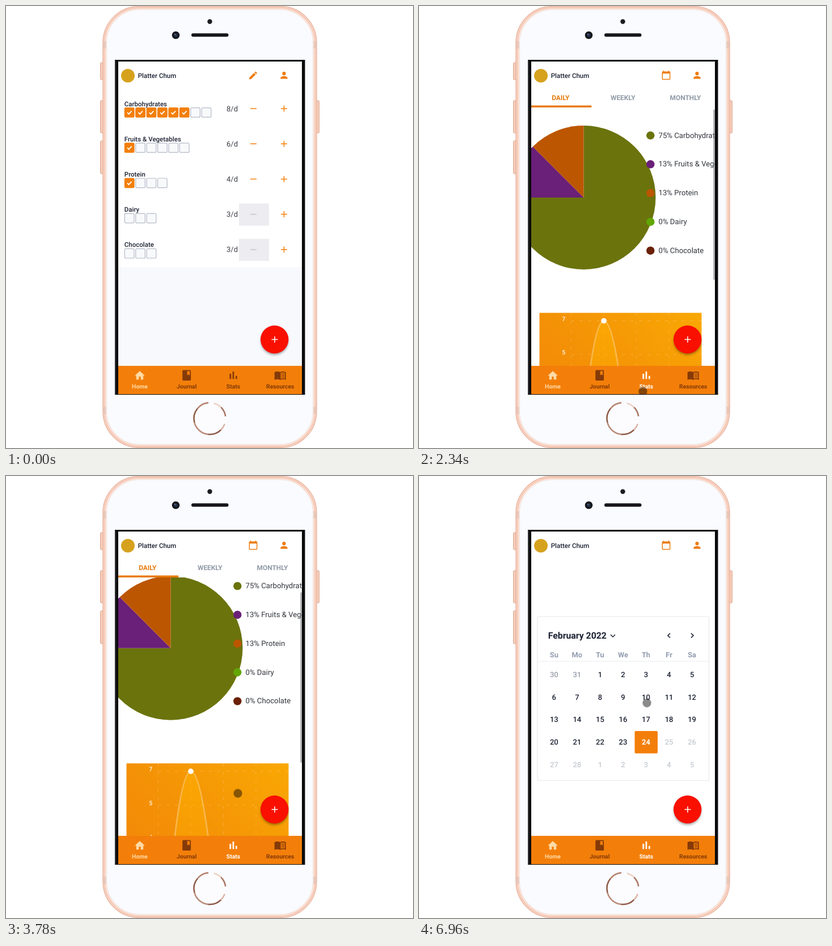
These frames come from a looping animation (718 px wide and 780 px high, 6.99 s). An HTML page:

```html
<!DOCTYPE html>
<html lang="en">
<head>
<meta charset="utf-8">
<title>Portion tracker demo</title>
<style>
  html, body { margin: 0; width: 100%; height: 100%; overflow: hidden; background: #fff; }
  svg { display: block; width: 100%; height: 100%; font-family: Roboto, "Open Sans", sans-serif; text-rendering: geometricPrecision; }
</style>
</head>
<body>
<svg id="stage" viewBox="0 0 718 780"></svg>
<script>
const LOOP = 6990;
const ORANGE = '#f37f0a';
const INK = '#1c2233';

const ICONS = {
  pencil: 'M3 17.2V21h3.8L17.8 9.9l-3.7-3.7zM20.7 7c.4-.4.4-1 0-1.4l-2.3-2.3c-.4-.4-1-.4-1.4 0l-1.9 1.8 3.8 3.8z',
  person: 'M12 12a4 4 0 1 0 0-8a4 4 0 0 0 0 8zm0 2c-2.7 0-8 1.3-8 4v2h16v-2c0-2.7-5.3-4-8-4z',
  calendar: 'M20 3h-1V1h-2v2H7V1H5v2H4a2 2 0 0 0-2 2v16a2 2 0 0 0 2 2h16a2 2 0 0 0 2-2V5a2 2 0 0 0-2-2zm0 18H4V8h16z',
  home: 'M10 20.5v-6h4v6h5v-8h3l-10-9-10 9h3v8z',
  book: 'M6 2h12a2 2 0 0 1 2 2v16a2 2 0 0 1-2 2H6a2 2 0 0 1-2-2V4a2 2 0 0 1 2-2zM18 4h-5v8l2.5-1.5L18 12z',
  bars: 'M5 9.2h3V19H5zM10.6 5h2.8v14h-2.8zM16.2 13H19v6h-2.8z',
  reader: 'M1 6c3-2 8-2 11 0c3-2 8-2 11 0v15c-3-1.6-8-1.6-11 0c-3-1.6-8-1.6-11 0zM13 7.5v11.2c2.5-1 5.5-1 8-.4V7c-2.5-.8-5.5-.7-8 .5zM14.5 9c2-.7 3.5-.7 5.5-.4v1.5c-2-.3-3.5-.3-5.5.4zM14.5 12c2-.7 3.5-.7 5.5-.4v1.5c-2-.3-3.5-.3-5.5.4zM14.5 15c2-.7 3.5-.7 5.5-.4v1.5c-2-.3-3.5-.3-5.5.4z'
};

const rect = (x, y, w, h, fill, extra = '') =>
  `<rect x="${x}" y="${y}" width="${w}" height="${h}" fill="${fill}" ${extra}/>`;
const circle = (x, y, r, fill, extra = '') =>
  `<circle cx="${x}" cy="${y}" r="${r}" fill="${fill}" ${extra}/>`;
const line = (d, color, width = 1.5, extra = '') =>
  `<path d="${d}" fill="none" stroke="${color}" stroke-width="${width}" ${extra}/>`;
const text = (x, y, size, weight, fill, str, anchor = 'start') =>
  `<text x="${x}" y="${y}" font-size="${size}" font-weight="${weight}" fill="${fill}" text-anchor="${anchor}">${str}</text>`;
const icon = (name, x, y, scale, fill, id = '') =>
  `<path ${id && `id="${id}"`} d="${ICONS[name]}" fill="${fill}" fill-rule="evenodd" transform="translate(${x} ${y}) scale(${scale}) translate(-12 -12)"/>`;
const minus = (x, y, color) => line(`M${x - 5.5} ${y}h11`, color);
const plus = (x, y, color, r = 5.5) => line(`M${x - r} ${y}h${2 * r}M${x} ${y - r}v${2 * r}`, color);

function phone() {
  const button = (x, y, h) => rect(x, y, 6, h, '#f6cdbb', 'rx="1.5" stroke="#dda58f" stroke-width="1"');
  const bands = [171, 541].map(x => [62, 707].map(y => rect(x, y, 7, 13, '#e3c4b8', 'opacity=".7"')).join('')).join('');
  const arc = (from, to, color) => {
    const at = deg => {
      const a = deg * Math.PI / 180;
      return `${359.5 + 28 * Math.cos(a)} ${728 + 28 * Math.sin(a)}`;
    };
    return line(`M${at(from)}A28 28 0 0 1 ${at(to)}`, color, 2.6);
  };
  return button(166.5, 100, 30) + button(166.5, 167, 57) + button(166.5, 238, 58) + button(546.5, 167, 57) +
    rect(171, 0.6, 377, 778.8, '#fbe0d5', 'rx="64" stroke="#e6ad96" stroke-width="1.3"') +
    rect(173.5, 3, 372, 774, 'none', 'rx="62" stroke="#f5c5b2" stroke-width="2"') + bands +
    rect(177.5, 6.5, 364, 767, '#fafbff', 'rx="58" stroke="#f4e9e5" stroke-width="1.5"') +
    circle(359.5, 27.5, 4.2, '#1b1b20') +
    circle(299.5, 51.5, 6.8, '#15161c') + circle(299.5, 51.5, 3, '#26344f') + circle(298, 50, 1, '#7d8ba5') +
    rect(327, 48.3, 65.5, 6, '#17171b', 'rx="3"') +
    circle(359.5, 728, 28, '#fcfcff') +
    arc(0, 360 - .1, '#f7ece7') + arc(95, 165, '#b98a78') + arc(165, 220, '#8e5b47') + arc(220, 265, '#b88672') +
    arc(285, 315, '#ecd0c4') + arc(315, 352, '#a97562') + arc(45, 95, '#8e5b47') + arc(20, 45, '#dbb5a6') +
    rect(192, 95, 335.5, 591, '#0b0b0c') + line('M193 96V685.5', '#55565a', 1);
}

function homeScreen() {
  const rows = [['Carbohydrates', 8, 6], ['Fruits &amp; Vegetables', 6, 1], ['Protein', 4, 1], ['Dairy', 3, 0], ['Chocolate', 3, 0]];
  const box = (x, y, on) =>
    rect(x + .6, y + .6, 16.6, 16.6, on ? ORANGE : '#f8f9fb', `rx="2" stroke="${on ? ORANGE : '#b3bac8'}" stroke-width="1.2"`) +
    (on ? line(`M${x + 5.2} ${y + 9}l2.6 2.7l5-5.3`, '#fff', 1.8) : '');
  const row = ([name, total, done], i) => {
    const y = 181 + i * 62.2;
    let out = text(208.8, y - 4.4, 11.5, 500, INK, name);
    for (let k = 0; k < total; k++) out += box(208.8 + k * 19.4, y - 2, k < done);
    out += text(389, y + 4.6, 13, 400, '#3c3f47', total + '/d');
    if (!done) out += rect(411, y - 19, 53, 39, '#ececf1');
    return out + minus(436.5, y, done ? ORANGE : '#c3c6cd') + plus(490.5, y, ORANGE);
  };
  return rect(198, 98, 324, 363, '#fff') + rows.map(row).join('') + icon('pencil', 436, 122.5, .76, '#ee7c10');
}

function pieAndLegend() {
  const cx = 290.5, cy = 338, r = 127, k = r * Math.SQRT1_2;
  const slice = (fromX, fromY, toX, toY, fill, large = 0) =>
    `<path d="M${cx} ${cy}L${cx + fromX} ${cy + fromY}A${r} ${r} 0 ${large} 1 ${cx + toX} ${cy + toY}z" fill="${fill}"/>`;
  const items = [['75% Carbohydrates', '#6b730d'], ['13% Fruits &amp; Vegetables', '#6a1f78'], ['13% Protein', '#bc5600'],
    ['0% Dairy', '#62a604'], ['0% Chocolate', '#6a2106']];
  return slice(0, -r, -r, 0, items[0][1], 1) + slice(-r, 0, -k, -k, items[1][1]) + slice(-k, -k, 0, -r, items[2][1]) +
    items.map(([label, color], i) => {
      const y = 228.5 + i * 50.8;
      return circle(408.3, y, 7.2, color) + text(422.5, y + 4, 13.2, 400, '#33363c', label);
    }).join('');
}

function lineChart() {
  const top = 555.5, bottom = 794;
  const points = [0, 7, 1, 0].map((v, i) => [268.5 + i * 57.5, bottom - v * (bottom - top) / 7]);
  let curve = `M${points[0]}`;
  points.slice(1).forEach(([x, y], i) => {
    const [px, py] = points[i], mx = (px + x) / 2, my = (py + y) / 2;
    curve += `Q${(px + mx) / 2} ${py} ${mx} ${my}Q${(mx + x) / 2} ${y} ${x} ${y}`;
  });
  let grid = '', labels = '';
  [7, 5, 4, 2, 0].forEach((v, i) => {
    const y = top + i * (bottom - top) / 4;
    grid += `M268.5 ${y}H498`;
    labels += text(258.5, y + .3, 10.8, 500, '#fff3df', v, 'end');
  });
  ['Morning', 'Afternoon', 'Evening', 'Night'].forEach((name, i) => {
    const x = points[i][0];
    grid += `M${x} 541.5V${bottom}`;
    labels += text(x, 815.5, 10.5, 500, '#fff0d8', name, 'middle');
  });
  return rect(212.5, 541.5, 286, 318.5, 'url(#chartFill)') +
    line(grid, 'rgba(255,255,255,.22)', 1, 'stroke-dasharray="5 10"') +
    `<path d="${curve}z" fill="url(#areaFill)"/>` + line(curve, 'rgba(255,255,255,.28)', 2.8) +
    points.map(([x, y]) => circle(x, y, 4.8, '#fff')).join('') + labels;
}

function statsScreen() {
  const tab = (x, name, color) => text(x, 166.2, 11.9, 700, color, name, 'middle');
  return rect(198, 98, 324, 537, '#fff') +
    `<g clip-path="url(#scrollClip)"><g id="content">${pieAndLegend()}${lineChart()}</g>` +
    rect(519, 183, 3, 300, '#6d7078', 'id="scrollbar" opacity=".5"') + '</g>' +
    tab(249.8, 'DAILY', '#e87a0d') + tab(359.8, 'WEEKLY', '#8f99a6') + tab(470, 'MONTHLY', '#8f99a6') +
    rect(196, 175.5, 108.5, 3.4, '#e87a0d', 'rx="1.5"');
}

function calendarScreen() {
  const column = i => 238.3 + i * 40.55;
  let out = rect(198, 98, 324, 537, '#fff') +
    rect(209, 248, 302.5, 289.5, '#fff', 'rx="3" stroke="#e7e9ee" stroke-width="1.2"') +
    text(227.8, 286.5, 15.8, 700, INK, 'February 2022') +
    line('M338 280l4 4l4-4', INK) + line('M443 277.5l-4 4l4 4', INK, 1.7) + line('M480 277.5l4 4l-4 4', INK, 1.7) +
    line('M209.5 327.2H511', '#e9ebf0', 1) + rect(380.5, 450, 40.5, 39.5, ORANGE, 'rx="2"');
  ['Su', 'Mo', 'Tu', 'We', 'Th', 'Fr', 'Sa'].forEach((d, i) => {
    out += text(column(i), 319.7, 12.8, 700, '#929cb0', d, 'middle');
  });
  for (let i = 0; i < 35; i++) {
    const offset = i - 1;
    const day = offset < 1 ? offset + 31 : offset > 28 ? offset - 28 : offset;
    const color = offset < 1 ? '#989daa' : offset === 24 ? '#fff' : offset > 24 ? '#c5cad1' : INK;
    out += text(column(i % 7), 355 + Math.floor(i / 7) * 39.7, 13, offset === 24 ? 700 : 500, color, day, 'middle');
  }
  return out;
}

function navBar() {
  const item = (name, label, x, scale, color, id) =>
    `<g ${id ? `id="${id}"` : ''} fill="${color}">${icon(name, x, 651.7, scale, 'inherit')}${text(x, 675.2, 10.4, 700, 'inherit', label, 'middle')}</g>`
      .replaceAll('fill="inherit"', '');
  const dark = '#853a08';
  return rect(198, 635, 324, 50, ORANGE) +
    item('home', 'Home', 236, .88, '#ffdba6') + item('book', 'Journal', 318.7, .93, dark) +
    item('bars', 'Stats', 401, .95, dark, 'statsTab') + item('reader', 'Resources', 483.7, .91, dark);
}

const stage = document.getElementById('stage');
stage.innerHTML = `
  <defs>
    <clipPath id="screenClip"><rect x="198" y="98" width="324" height="587"/></clipPath>
    <clipPath id="scrollClip"><rect x="198" y="179" width="324" height="456"/></clipPath>
    <linearGradient id="chartFill" x1="0" y1="1" x2="1" y2="0">
      <stop offset="0" stop-color="#f27e0a"/><stop offset=".55" stop-color="#f49306"/><stop offset="1" stop-color="#f9a804"/>
    </linearGradient>
    <linearGradient id="areaFill" x1="0" y1="0" x2="0" y2="1">
      <stop offset="0" stop-color="#ffb400" stop-opacity=".5"/><stop offset="1" stop-color="#ffb400" stop-opacity=".12"/>
    </linearGradient>
    <filter id="soft" x="-30%" y="-30%" width="160%" height="160%"><feGaussianBlur stdDeviation="2"/></filter>
  </defs>
  ${phone()}
  <g clip-path="url(#screenClip)">
    ${rect(198, 98, 324, 587, '#f8f9fd')}
    <g id="home">${homeScreen()}</g>
    <g id="stats">${statsScreen()}</g>
    <g id="calendar">${calendarScreen()}</g>
    ${icon('calendar', 436, 122.2, .74, '#ee7c10', 'calendarIcon')}
    ${circle(215, 123, 12, '#d6a21e')}
    ${text(232.7, 127, 11.5, 500, INK, 'Platter Chum')}
    ${icon('person', 490.5, 122.3, .78, '#ee7c10')}
    ${navBar()}
    ${circle(473.7, 591.5, 24, '#000', 'opacity=".38" filter="url(#soft)"')}
    ${circle(473.7, 588.5, 24.7, '#f91000')}
    ${plus(474, 588.5, '#fff')}
    <g id="cursor">${circle(0, 0, 8.4, '#000', 'opacity=".12"')}${circle(0, 0, 7.4, '#000', 'opacity=".38"')}</g>
  </g>`;

const el = id => document.getElementById(id);
const [home, stats, calendar, content, scrollbar, cursor, statsTab, calendarIcon] =
  ['home', 'stats', 'calendar', 'content', 'scrollbar', 'cursor', 'statsTab', 'calendarIcon'].map(el);

// Eased value between [time, value] keys, held outside them.
function track(t, keys) {
  if (t <= keys[0][0]) return keys[0][1];
  for (let i = 1; i < keys.length; i++) {
    const [t0, a] = keys[i - 1], [t1, b] = keys[i];
    if (t < t1) {
      const p = (t - t0) / (t1 - t0);
      return a + (b - a) * p * p * (3 - 2 * p);
    }
  }
  return keys[keys.length - 1][1];
}

const SCROLL = [[2800, 0], [3260, 225], [3540, 225], [3860, 0]];
const CURSOR_X = [[950, 422.5], [1360, 395], [2400, 395], [2750, 409], [4000, 409], [4550, 437]];
const CURSOR_Y = [[950, 564.5], [1360, 680], [2400, 680], [2750, 560], [4000, 560], [4550, 112], [4700, 112], [5000, 135.5]];
const LAST_MOVE = [5400, 6300];
const STATS_AT = 1470, CALENDAR_AT = 4780;

const show = (node, on) => node.setAttribute('display', on ? 'inline' : 'none');

function render(t) {
  const scroll = track(t, SCROLL);
  show(home, t < STATS_AT);
  show(stats, t >= STATS_AT && t < CALENDAR_AT);
  show(calendar, t >= CALENDAR_AT);
  show(calendarIcon, t >= STATS_AT);
  statsTab.setAttribute('fill', t < STATS_AT ? '#853a08' : '#fff');
  content.setAttribute('transform', `translate(0 ${-scroll})`);
  scrollbar.setAttribute('y', 183 + scroll * .655);

  const last = track(t, [[LAST_MOVE[0], 0], [LAST_MOVE[1], 1]]);
  const x = track(t, CURSOR_X) + last * (402 - 437);
  const y = track(t, CURSOR_Y) + last * (400.5 - 135.5);
  cursor.setAttribute('transform', `translate(${x} ${y})`);
  cursor.setAttribute('opacity', track(t, [[760, 0], [880, 1]]));
}

const start = performance.now();
function tick() {
  render((performance.now() - start) % LOOP);
  requestAnimationFrame(tick);
}
render(0);
requestAnimationFrame(tick);
</script>
</body>
</html>
```
